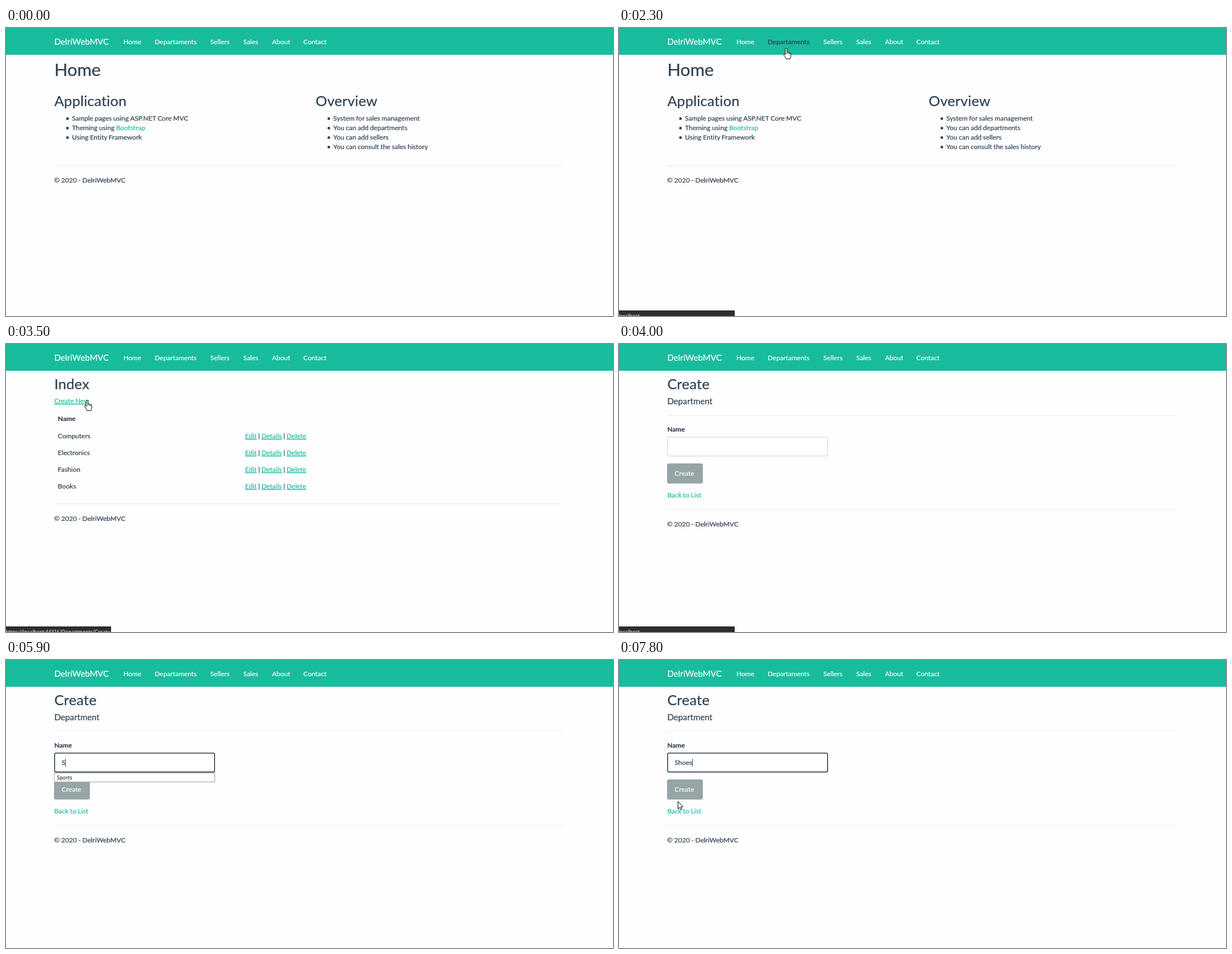
Recreate the animation shown at these times as an HTML page. Size 1086x516 px, loop 8 s.

```html
<!DOCTYPE html>
<html lang="en">
<head>
<meta charset="utf-8">
<title>Web MVC demo</title>
<style>
  html, body { margin: 0; width: 100%; height: 100%; overflow: hidden; background: #fefefe; }
  svg { display: block; width: 1086px; height: 516px; }
  text {
    font: 12px Lato, sans-serif; font-variant-ligatures: none; word-spacing: -.3px;
    white-space: pre; color: #2c3e50;
    fill: currentColor; stroke: currentColor; stroke-width: .2px;
  }
  .brand, .h4 { font-size: 15.2px; }
  .h1 { font-size: 31.2px; }
  .h2 { font-size: 25.6px; letter-spacing: .2px; }
  .bold { font-weight: bold; }
  .white { color: #fff; }
  .link { color: #18bc9c; }
  .line { text-decoration: underline; }
  .ui { font: 9px "Noto Sans", "Open Sans", sans-serif; stroke: none; }
  .black { color: #000; }
</style>
</head>
<body>
<svg id="stage" viewBox="0 0 1086 516"></svg>
<script>
const LOOP = 8000;
const BRAND = "DelriWebMVC";
const URL_BASE = "https://localhost:44316/Departments";

const text = (x, y, s, cls = "", id = "") =>
  `<text x="${x}" y="${y}" class="${cls}" id="${id}">${s}</text>`;
const rect = (x, y, w, h, fill, extra = "") =>
  `<rect x="${x}" y="${y}" width="${w}" height="${h}" fill="${fill}" ${extra}/>`;
const group = (id, ...parts) => `<g id="${id}">${parts.join("")}</g>`;
const rule = y => rect(86, y, 911, 1, "#ecf0f1");
const footer = y => rule(y) + text(86, y + 31, `© 2020 - ${BRAND}`);
const list = (x, items) => items.map((s, i) => {
  const y = 166 + 17 * i;
  return `<circle cx="${x - 8}" cy="${y - 3.6}" r="2.4" fill="#2c3e50"/>` + text(x, y, s);
}).join("");
const link = s => `<tspan class="link line">${s}</tspan>`;

const navbar = rect(0, 0, 1086, 48, "#18bc9c") +
  text(86.4, 30, BRAND, "brand white") +
  [["Home", 210], ["Departaments", 266], ["Sellers", 365.5], ["Sales", 424.5],
   ["About", 476], ["Contact", 532]]
    .map(([s, x]) => text(x, 29, s, "white", "nav" + s)).join("");

const home = group("home",
  text(86.4, 86, "Home", "h1"),
  text(86.4, 140, "Application", "h2"),
  list(118, ["Sample pages using ASP.NET Core MVC",
    'Theming using <tspan class="link">Bootstrap</tspan>', "Using Entity Framework"]),
  text(554, 140, "Overview", "h2"),
  list(585.6, ["System for sales management", "You can add departments",
    "You can add sellers", "You can consult the sales history"]),
  footer(246));

const index = group("index",
  text(86.4, 81, "Index", "h2"),
  text(86.4, 106, "Create New", "link", "createNew"),
  text(92.8, 138, "Name", "bold"),
  ["Computers", "Electronics", "Fashion", "Books"].map((s, i) =>
    text(92.8, 169 + 30 * i, s) +
    text(427.8, 169 + 30 * i, `${link("Edit")} | ${link("Details")} | ${link("Delete")}`)).join(""),
  footer(286));

const create = group("create",
  text(86.4, 81, "Create", "h2"),
  text(86.4, 108, "Department", "h4"),
  rule(127),
  text(86.4, 157, "Name", "bold"),
  rect(87, 166.8, 286.2, 33.8, "#fff", 'rx="2.4" stroke-width="1.6" id="field"'),
  text(99.6, 188, "", "", "typed"),
  rect(0, 177, 1, 14, "#2c3e50", 'id="caret"'),
  rect(86, 214, 64, 36, "#95a5a6", 'rx="3.2"'),
  text(99.6, 236, "Create", "white"),
  group("suggest", rect(86.5, 202.5, 287, 16, "#fff", 'stroke="#a0a0a0"'),
    text(91, 214, "Sports", "ui black")),
  text(86.4, 275, "Back to List", "link"),
  footer(296));

const status = group("status",
  rect(0, 506, 0, 10, "#2c2e2d", 'id="statusBox"'),
  text(-1, 519, "", "ui white", "statusText"));

const outline = 'fill="#fff" stroke="#000" stroke-linejoin="round"';
const pointers =
  `<path id="arrow" ${outline} d="M.5 .5V13.6L3.5 10.8 5.6 15.4 7.6 14.5 5.6 10H9.6Z"/>` +
  `<path id="hand" ${outline} d="M-1.5 2Q-1.5 .5 0 .5T1.5 2V7.5Q3.6 6.2 4.5 8Q6.2 7.2 6.8 8.8
    Q8.4 8.4 8.4 10.6V14Q8.2 16.6 7 19.3H0Q-.6 17-4 12.7Q-5 10.6-3.4 10.2Q-2.4 10-1.5 12Z
    M1.5 7.5V10.5M4.5 8V10.8M6.8 8.8V11"/>` +
  `<path id="beam" fill="none" stroke="#fefefe" d="M-2.5 .5H2.5M-2.5 15.5H2.5M0 0V16"/>`;

document.getElementById("stage").innerHTML =
  rect(0, 0, 1086, 516, "#fefefe") + navbar + home + index + create + status + pointers;
const $ = id => document.getElementById(id);

// Each track holds [start time, values...]; the last started entry is current.
const pages = [[0, "home"], [2400, "index"], [4000, "create"]];
const bars = [[0, "", 0], [1900, URL_BASE, 158], [2100, "localhost", 207],
  [2600, URL_BASE, 158], [3100, "", 0], [3500, URL_BASE + "/Create", 188],
  [3900, "localhost", 207], [4100, "", 0]];
const typing = [[0, ""], [5900, "S"], [6100, "Sh"], [6400, "Sho"], [6600, "Shoe"], [6700, "Shoes"]];
const blink = [[0, false], [5100, true], [5600, false], [5900, true], [7100, false], [7700, true]];
const moves = [
  [0, "", 0, 0],
  [800, "arrow", 654, 2], [900, "arrow", 606, 92], [1000, "arrow", 430, 165],
  [1100, "arrow", 200, 166], [1200, "arrow", 60, 124], [1300, "arrow", 17, 78],
  [1400, "arrow", 160, 60], [1500, "hand", 294, 42], [1600, "hand", 297, 38],
  [1700, "hand", 299, 28], [2100, "hand", 299, 36],
  [3000, "arrow", 232, 63], [3100, "arrow", 198, 76], [3200, "arrow", 168, 88],
  [3300, "hand", 150, 97], [3500, "hand", 145, 100],
  [4000, "beam", 145.5, 100], [4400, "beam", 147, 130], [4500, "beam", 150, 168],
  [4600, "beam", 151.5, 190], [4900, "beam", 151.5, 180], [5900, "", 0, 0],
  [7400, "beam", 150.5, 190], [7500, "arrow", 142, 303],
  [7700, "arrow", 122, 276], [7800, "arrow", 105, 253]];

const at = (track, t) => track.filter(k => k[0] <= t).pop().slice(1);
const show = (id, on) => $(id).style.display = on ? "" : "none";

function draw(t) {
  const [page] = at(pages, t);
  for (const id of ["home", "index", "create"]) show(id, id === page);

  const [kind, x, y] = at(moves, t);
  for (const id of ["arrow", "hand", "beam"]) show(id, id === kind);
  if (kind) $(kind).setAttribute("transform", `translate(${x} ${y})`);
  const hand = kind === "hand";
  $("navDepartaments").style.color = hand && y < 48 ? "#2c3e50" : "#fff";
  $("createNew").style.textDecoration = hand && y > 90 ? "underline" : "none";

  const [label, width] = at(bars, t);
  show("status", width > 0);
  $("statusBox").setAttribute("width", width);
  $("statusText").textContent = label;

  const [word] = at(typing, t);
  $("typed").textContent = word;
  $("field").setAttribute("stroke", t >= 5100 ? "#2c3e50" : "#dce4ec");
  show("suggest", word === "S");
  show("caret", at(blink, t)[0]);
  if (page === "create") {
    const end = word ? $("typed").getComputedTextLength() : 0;
    $("caret").setAttribute("x", Math.round(99.6 + end));
  }
}

const start = performance.now();
function tick() {
  draw((performance.now() - start) % LOOP);
  requestAnimationFrame(tick);
}
tick();
</script>
</body>
</html>
```
